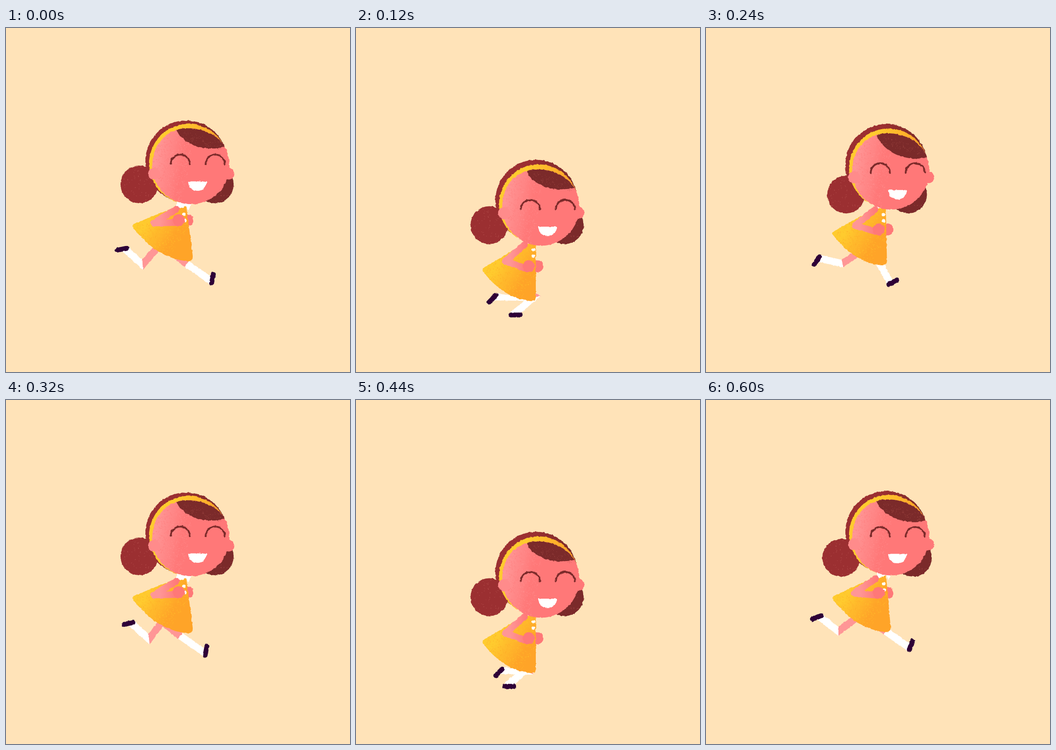
These frames come from a looping animation (748x748 px, 640 ms). An HTML page with a canvas:

```html
<!DOCTYPE html>
<html lang="en">
<head>
<meta charset="utf-8">
<title>Running girl</title>
<style>
  html, body { margin: 0; width: 100%; height: 100%; overflow: hidden; background: #ffe3b8; }
  canvas { display: block; filter: url(#rough); }
  svg { position: absolute; }
</style>
</head>
<body>
<svg width="0" height="0">
  <filter id="rough" x="0" y="0" width="1" height="1" color-interpolation-filters="sRGB">
    <feTurbulence type="fractalNoise" baseFrequency=".16" numOctaves="2" seed="4"/>
    <feDisplacementMap in="SourceGraphic" scale="4" xChannelSelector="R" yChannelSelector="G"/>
  </filter>
</svg>
<canvas width="748" height="748"></canvas>
<script>
const ctx = document.querySelector('canvas').getContext('2d');
const STEP = 40, STRIDE = 640, BOUNCE = 320;
const SKIN = '#ff7878', PALE = '#ff9696', HAIR = '#9b2f31', DARK = '#7b2a2a',
      SUN = '#ffcb2e', ORANGE = '#ffa428', WHITE = '#fff', SHOE = '#2e0037';

// time, head drop, nod, fringe drop, bun shift x, bun drop
const BODY = [
  [0, 0, 0, 0, 0, 0],
  [80, 38.5, 2, -3, -3, 34],
  [120, 85.5, 13, 3, 0, 88.5],
  [160, 53, 30, 15.5, 7, 70],
  [200, 24, 19, 21, 22, 45],
  [280, -3, 4, 6, 4, 3]
];

// time, knee x y, heel x y, toe x y
const LEG = [
  [0, 393, 513, 447, 555, 451, 535],
  [80, 374, 565, 406, 626, 417, 608],
  [120, 388, 584, 337, 624, 357, 624],
  [160, 308, 557, 268, 617, 288, 623],
  [200, 295, 524, 237, 536, 237, 556],
  [280, 302, 508, 264, 474, 246, 481],
  [320, 311, 520, 276, 484, 256, 488],
  [400, 349, 556, 304, 538, 284, 547],
  [440, 376, 592, 318, 585, 302, 601],
  [480, 373, 549, 312, 569, 312, 589],
  [520, 379, 508, 372, 574, 392, 580],
  [600, 391, 503, 442, 543, 449, 523]
];

let seed = 7;
const random = () => (seed = seed * 16807 % 2147483647) / 2147483647;
const specks = Array.from({ length: 1500 }, () => [random(), random(), random()]);

// Smooth periodic interpolation through keyed rows
function pose(keys, period, time) {
  const t = time % period, n = keys.length;
  const i = keys.findLastIndex(k => k[0] <= t);
  const row = j => {
    const k = keys[(j + n) % n];
    return [k[0] + Math.floor(j / n) * period, ...k.slice(1)];
  };
  const [a, b, c, d] = [i - 1, i, i + 1, i + 2].map(row);
  const h = c[0] - b[0], u = (t - b[0]) / h, v = 1 - u;
  return b.slice(1).map((p, k) => {
    const q = c[k + 1];
    const m0 = (q - a[k + 1]) / (c[0] - a[0]) * h;
    const m1 = (d[k + 1] - p) / (d[0] - b[0]) * h;
    return v * v * (1 + 2 * u) * p + u * u * (3 - 2 * u) * q + u * v * v * m0 - u * u * v * m1;
  });
}

function gradient(x, y, dx, dy, from, to) {
  const g = ctx.createLinearGradient(x, y, x + dx, y + dy);
  g.addColorStop(0, from);
  g.addColorStop(1, to);
  return g;
}

function fill(path, color) {
  ctx.fillStyle = color;
  ctx.fill(path);
}

function oval(x, y, rx, color, ry = rx) {
  const p = new Path2D();
  p.ellipse(x, y, rx, ry, 0, 0, 7);
  fill(p, color);
}

function poly(points, color) {
  fill(new Path2D('M' + points.join('L') + 'Z'), color);
}

function line(points, width, color) {
  ctx.lineWidth = width;
  ctx.strokeStyle = color;
  ctx.lineCap = ctx.lineJoin = 'round';
  ctx.stroke(new Path2D('M' + points.join('L')));
}

// Gradient fill with a stippled transition
function shade(path, x, y, dx, dy, from, to) {
  fill(path, gradient(x, y, dx, dy, from, to));
  const len = Math.hypot(dx, dy);
  ctx.save();
  ctx.clip(path);
  ctx.globalAlpha = .5;
  for (const [r, s, size] of specks) {
    const u = r * 1.5 - .25, w = (s - .5) * 220 / len;
    ctx.fillStyle = u < .5 ? to : from;
    ctx.fillRect(x + dx * u - dy * w, y + dy * u + dx * w, .7 + size, .7 + size);
  }
  ctx.restore();
}

function bun(x, y, color) {
  oval(x, y, 41, color);
  ctx.fillStyle = '#c7666188';
  for (const [r, s] of specks.slice(0, 70)) {
    const d = 39 * Math.sqrt(r);
    ctx.fillRect(x + d * Math.cos(s * 6.28), y + d * Math.sin(s * 6.28), 1.2, 1.2);
  }
}

function leg(time, hipY, dx, lift) {
  const [kx, ky, hx, hy, tx, ty] = pose(LEG, STRIDE, time);
  const dy = lift * (1 - Math.cos(time / STRIDE * 2 * Math.PI)) / 2;
  const hip = [345, hipY - dy], knee = [kx, ky], heel = [hx, hy];
  const size = 20 / Math.hypot(tx - hx, ty - hy);
  const toe = [hx + (tx - hx) * size, hy + (ty - hy) * size];
  const ankle = heel.map((v, i) => v + (toe[i] - v) * .2);
  const normal = (p, q) => {
    const l = Math.hypot(q[0] - p[0], q[1] - p[1]);
    return [(p[1] - q[1]) / l, (q[0] - p[0]) / l];
  };
  const n1 = normal(hip, knee), n2 = normal(knee, ankle);
  const bend = Math.max(.5, 1 + n1[0] * n2[0] + n1[1] * n2[1]);
  const miter = n1.map((v, i) => (v + n2[i]) / bend);
  const off = (p, n, w) => [p[0] + n[0] * w, p[1] + n[1] * w];
  const limb = (p, n, q, m, color) =>
    poly([off(p, n, 7.8), off(q, m, 7.8), off(q, m, -7.8), off(p, n, -7.8)], color);
  ctx.save();
  ctx.translate(dx, dy);
  limb(hip, n1, knee, miter, PALE);
  limb(knee, miter, ankle, n2, WHITE);
  line([heel, toe], 10.5, SHOE);
  ctx.restore();
}

function dress(drop, nod, neck) {
  const left = 430 + drop + nod * .75;
  const rx = 406 - nod * 1.15, ry = 503 + drop + nod * .1;
  const p = new Path2D(`M372 ${388 + neck} L280 ${left - 5} Q272 ${left} 277 ${left + 5}
    Q${(275 + rx) / 2 - 12} ${ry - 2} ${rx - 12} ${ry + 4} Q${rx + 1} ${ry + 5} ${rx} ${ry - 8}
    L${392 - nod * .1} ${388 + neck}Z`);
  shade(p, 305, left - 5, 55, 35, SUN, ORANGE);
  poly([[371, 374], [371, 393], [386, 390], [391, 386], [397, 397], [403, 380]]
    .map(([x, y]) => [x, y + neck]), WHITE);
  for (const y of [405, 419])
    oval(387 - nod * .13 + (y - 405) * (rx - 392) / 110, y + neck, 4, WHITE, 3.6);
}

function head(drop, nod, fringe) {
  const hair = new Path2D();
  hair.arc(392, 290 + drop, 89, 0, 7);
  fill(hair, gradient(385, 0, 80, 0, HAIR, DARK));

  const tilt = drop + nod * .3;
  oval(397, 295 + drop + nod * .2, 86, gradient(370, 0, 95, 0, SUN, ORANGE), 86.5);

  oval(484, 317 + drop, 12.5, SKIN);
  const cy = 300 + drop + nod * .2;
  const endY = 264 + drop + nod * .5;
  const face = new Path2D();
  face.ellipse(402, cy, 84, 83 + nod * .17, 0, 0, Math.PI);
  face.bezierCurveTo(318, 250 + tilt, 352, 218 + tilt, 394, 218 + tilt);
  face.bezierCurveTo(435, 218 + tilt, 466, 237 + tilt, 479, endY);
  face.quadraticCurveTo(485, endY + 16, 486, Math.max(cy, endY + 20));
  face.closePath();
  shade(face, 325, 285 + drop, 58, 10, PALE, SKIN);
  oval(322, 317 + drop, 13, '#ff8b8b');

  const low = drop + fringe;
  ctx.save();
  ctx.clip(face);
  const bangs = new Path2D(`M371 ${223 + tilt} C385 ${250 + tilt + fringe * .3} 425 ${270 + low}
    ${474 + fringe * .4} ${259 + low} L510 ${250 + low} L490 ${190 + drop} L371 ${190 + drop}Z`);
  fill(bangs, DARK);
  ctx.fillStyle = '#b0555088';
  for (const [r, s] of specks.slice(0, 90)) {
    const x = 385 + r * 85;
    ctx.fillRect(x, 222 + tilt + (x - 385) * .3 + s * 20, 1.2, 1.2);
  }
  ctx.restore();

  const y = drop + nod;
  ctx.lineWidth = 4;
  ctx.lineCap = 'round';
  ctx.strokeStyle = DARK;
  for (const x of [379, 455]) {
    ctx.beginPath();
    ctx.arc(x, 296 + y, 20.8, Math.PI, 0);
    ctx.stroke();
  }
  const mouth = new Path2D();
  mouth.arc(416.5, 333.5 + y, 20.5, 0, Math.PI);
  fill(mouth, WHITE);
}

function draw(time) {
  const [drop, nod, fringe, bunX, bunY] = pose(BODY, BOUNCE, time);
  const neck = drop - nod * .65;
  const hipY = 475 + drop - nod * .3;
  const handY = 418 + drop + nod * 1.12;

  ctx.fillStyle = '#ffe3b8';
  ctx.fillRect(0, 0, 748, 748);
  bun(290 + bunX, 340 + bunY, HAIR);
  bun(454 - bunX, 340 + bunY, DARK);
  leg(time, hipY, 0, 0);
  leg(time + STRIDE / 2, hipY, -14, -5);
  oval(394.5, handY, 13, SKIN);
  dress(drop, nod, neck);

  const sleeve = gradient(335, 0, 38, 0, PALE, SKIN);
  line([[370 - nod * .25, 394 + neck], [321 + nod * .3, 424 + drop - nod * .2], [371, handY + 5]],
    14.5, sleeve);
  oval(375.5, handY, 13, SKIN);
  head(drop, nod, fringe);
}

function tick() {
  draw(Math.floor(performance.now() % STRIDE / STEP) * STEP);
  requestAnimationFrame(tick);
}
tick();
</script>
</body>
</html>
```
